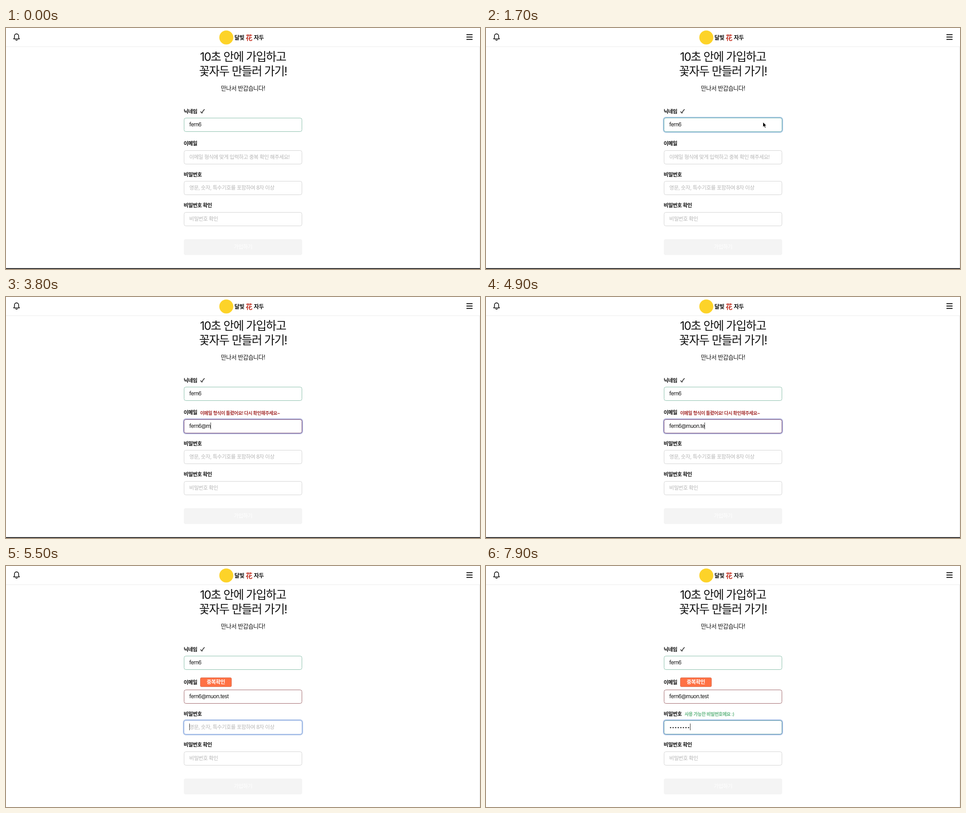
An HTML page that plays this animation: 1050 px wide and 534 px high, repeating every 8 s.

```html
<!DOCTYPE html>
<html lang="ko">
<head>
<meta charset="utf-8">
<style>
html, body { margin: 0; width: 100%; height: 100%; overflow: hidden; background: #fff; }
#stage {
  position: relative; width: 1050px; height: 534px; overflow: hidden; color: #111;
  font: 400 11.6px Inter, "Noto Sans CJK KR", "Noto Sans CJK", sans-serif;
  letter-spacing: -.045em; white-space: pre;
}
#stage div, #stage svg { position: absolute; box-sizing: border-box; }
#stage .text { line-height: 0; }
.center { left: 0; width: 1050px; text-align: center; }
.title { font-size: 25.6px; letter-spacing: -.055em; }
.label { left: 393.5px; font-weight: 600; letter-spacing: -.055em; }
.note { font-size: 10.2px; font-weight: 600; letter-spacing: -.05em; color: #a52f2f; }
.box { left: 394px; width: 262px; height: 31px; border: 1px solid #d3d3d3; border-radius: 4.5px; padding-left: 11px; line-height: 29px; background: #fff; }
.hint { color: #b6b6b6; }
.caret { display: inline-block; width: 1px; height: 15px; margin-right: -1px; background: #333; vertical-align: middle; position: relative; top: -1px; }
.dots { display: inline-block; height: 29px; vertical-align: top; background: radial-gradient(circle at 50% 52%, #111 1px, #1110 1.7px) 0 0 / 5.7px 29px; }
.button { left: 394px; top: 467.5px; width: 262px; height: 35px; border-radius: 4px; background: #f4f4f4; }
#check { left: 430px; top: 247px; width: 69.5px; height: 21px; border-radius: 3px; background: #ff7144; border: 1px solid #d9775c; color: #fff; font-weight: 600; line-height: 19px; text-align: center; }
.brand { font-size: 12.4px; font-weight: 800; top: 22px; }
</style>
</head>
<body>
<div id="stage">
  <div style="left:0;top:0;width:1050px;height:42px;border-bottom:1px solid #ebebeb"></div>
  <div style="left:1048px;top:42px;width:2px;height:492px;background:#f3f3f3"></div>
  <svg style="left:0;top:0" width="1050" height="41" fill="none" stroke="#111" stroke-width="1.6" stroke-linecap="round" stroke-linejoin="round">
    <path d="M17 24.2 L18.7 21.6 V18 C18.7 11.5 28 11.5 28 18 V21.6 L29.7 24.2 Z M21.6 26.3 C22.3 27.6 24.4 27.6 25.1 26.3"/>
    <path d="M1020 14.8 H1033.5 M1020 20 H1033.5 M1020 25.2 H1033.5" stroke-width="2" stroke-linecap="butt"/>
    <circle cx="488" cy="21" r="15.5" fill="#fdd329" stroke="none"/>
  </svg>
  <div class="text brand" style="left:506px">달빛</div>
  <div class="text brand" style="left:531px;font-size:15px;color:#c5392b">花</div>
  <div class="text brand" style="left:549px">자두</div>

  <div class="text center title" style="top:64px">10초 안에 가입하고</div>
  <div class="text center title" style="top:96px">꽃자두 만들러 가기!</div>
  <div class="text center" style="top:133px;font-size:13px">만나서 반갑습니다!</div>

  <div class="text label" style="top:184.5px">닉네임</div>
  <svg style="left:429px;top:178px" width="13" height="13" fill="none" stroke="#333" stroke-width="1.7"><path d="M1.8 7 L5 10.4 Q7 5.5 10.8 2.2"/></svg>
  <div class="box" id="nick" style="top:199px"></div>

  <div class="text label" id="emailLabel">이메일</div>
  <div class="text note" id="emailNote" style="left:430px;top:256.5px">이메일 형식이 틀렸어요! 다시 확인해주세요~</div>
  <div id="check">중복확인</div>
  <div id="lower" style="left:0;width:1050px;height:534px">
    <div class="box" id="email" style="top:270.5px"></div>
    <div class="text label" style="top:324.5px">비밀번호</div>
    <div class="text note" id="passNote" style="left:440px;top:325px"></div>
    <div class="box" id="pass" style="top:339px"></div>
    <div class="text label" style="top:393px">비밀번호 확인</div>
    <div class="box hint" style="top:407.5px">비밀번호 확인</div>
    <div class="button"></div>
    <div class="text center" style="top:485px;color:#fff;font-weight:500">가입하기</div>
    <div style="left:0;top:532px;width:1050px;height:2px;background:#2c2c2e"></div>
  </div>
  <svg id="cursor" width="12" height="17" style="left:-2px;top:-1px"><path d="M2 1 V12 L4.6 9.8 L6.4 13.8 L8.3 13 L6.6 9.1 H9.8 Z" fill="#000" stroke="#fff" stroke-width=".8"/></svg>
</div>
<script>
const LOOP = 8000, STEP = 100;
const EMAIL = "fern6@muon.test";
const EMAIL_KEYS = [2600, 2800, 2900, 3000, 3200, 3500, 3800, 4000, 4100, 4300, 4500, 4800, 4900, 5200, 5300];
const PASS_KEYS = [5800, 6000, 6100, 6200, 6400, 6800, 7100, 7600, 7900];
const BACKSPACE = 7500, VALID = 5200;
const PLAIN = "#d3d3d3", RING = "#a9c0e8";
const CARET = '<span class="caret"></span>';
const el = Object.fromEntries([...document.querySelectorAll("[id]")].map(e => [e.id, e]));
const pressed = (keys, t) => keys.filter(k => k <= t).length;
const show = (e, on) => e.style.visibility = on ? "visible" : "hidden";

function field(box, html, border, ring) {
  if (box.html !== html) box.innerHTML = box.html = html;
  box.style.borderColor = border;
  box.style.boxShadow = ring ? `0 0 0 2px ${ring}` : "none";
}

function withHint(typed, hint, focused) {
  const caret = focused ? CARET : "";
  return typed ? typed + caret : `${caret}<span class="hint">${hint}</span>`;
}

function moveCursor(t) {
  const ease = p => 1 - (1 - Math.min(1, Math.max(0, p))) ** 2;
  const a = ease((t - 100) / 500), b = ease((t - 800) / 400);
  el.cursor.style.transform = `translate(${538 + 71 * a + 4.5 * b}px, ${447 - 198 * a - 40.5 * b}px)`;
  show(el.cursor, t >= 100 && t < 2100);
}

function render(t) {
  const onNick = t >= 1200 && t < 2100, onEmail = t >= 2100 && t < 5500, onPass = t >= 5500;
  const letters = pressed(EMAIL_KEYS, t);
  const dots = pressed(PASS_KEYS, t) - (t >= BACKSPACE);
  const valid = t >= VALID, strong = dots >= 8;

  field(el.nick, "fern6" + (onNick && t < 1700 ? CARET : ""),
    onNick ? "#7fbdb8" : "#88bfaa", onNick && "#9fc2de");

  field(el.email, withHint(EMAIL.slice(0, letters), "이메일 형식에 맞게 입력하고 중복 확인 해주세요!", onEmail),
    letters ? (onEmail ? "#74446e" : "#a0666a") : onEmail ? RING : PLAIN,
    onEmail && (letters ? "#b4b8e0" : RING));

  field(el.pass, withHint(dots > 0 && `<span class="dots" style="width:${dots * 5.7}px"></span>`, "영문, 숫자, 특수기호를 포함하여 8자 이상", onPass),
    strong ? "#5b9aa0" : dots > 0 ? "#74527f" : onPass ? RING : PLAIN,
    onPass && RING);

  show(el.emailNote, letters && !valid);
  show(el.check, valid);
  el.emailLabel.style.top = (valid ? 257.5 : 256) + "px";
  el.lower.style.top = (valid ? 3 : 0) + "px";

  show(el.passNote, dots > 0);
  el.passNote.textContent = strong ? "사용 가능한 비밀번호에요 :)" : "비밀번호를 다시 작성해주세요!!";
  el.passNote.style.color = strong ? "#62b581" : "";
  moveCursor(t);
}

function tick() {
  render(Math.floor(performance.now() % LOOP / STEP) * STEP);
  requestAnimationFrame(tick);
}
tick();
</script>
</body>
</html>
```
